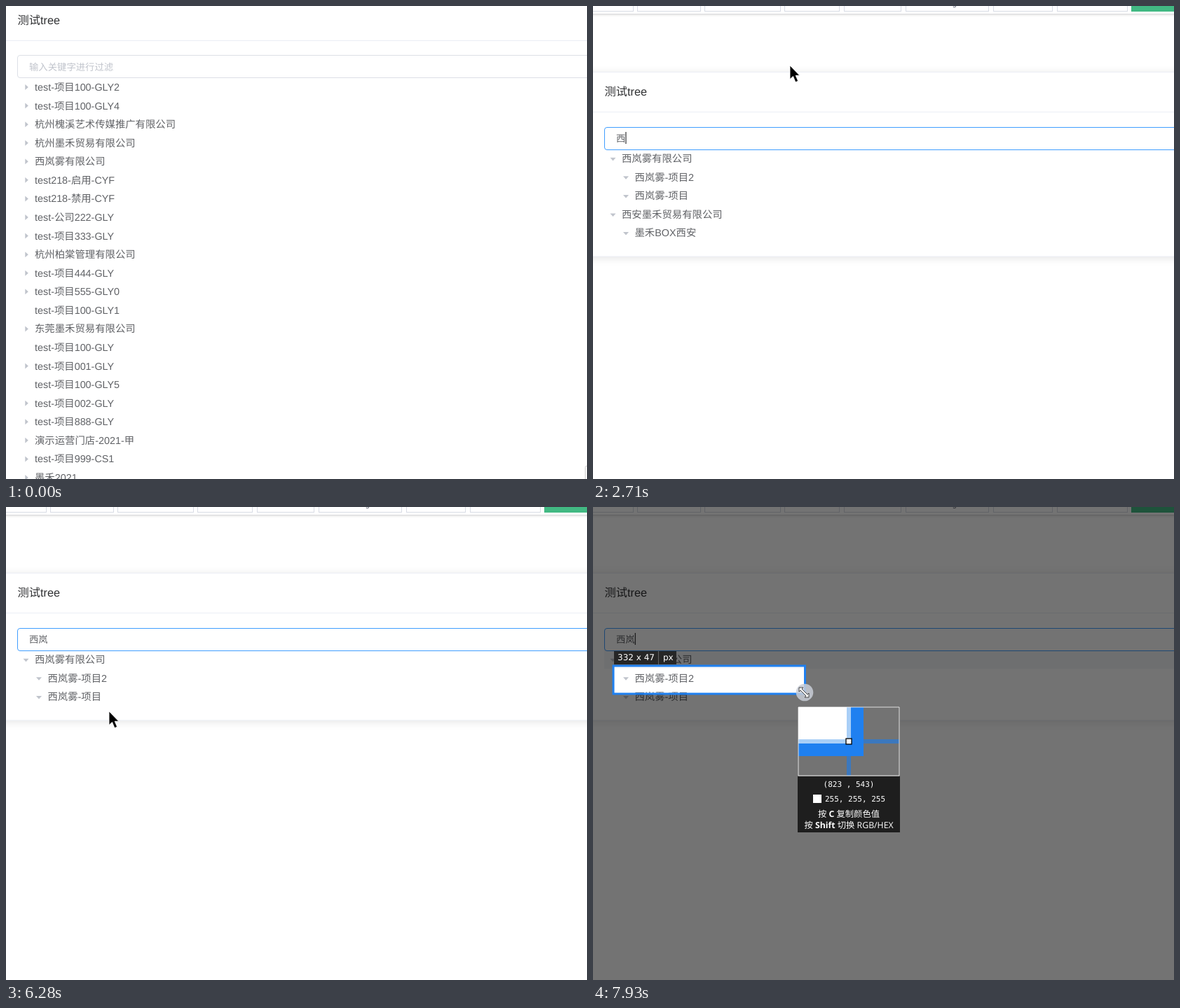
An HTML page for the animation above (8000 ms loop, 829 px wide and 676 px high).

```html
<!DOCTYPE html>
<html lang="zh-CN">
<head>
<meta charset="utf-8">
<style>
html, body { margin: 0; width: 100%; height: 100%; overflow: hidden; background: #fff; }
svg { display: block; width: 829px; height: 676px; font: 14.36px "Liberation Sans", "Noto Sans CJK SC", "Noto Sans CJK", sans-serif; }
.card { filter: drop-shadow(0 2px 6px rgba(0,0,0,.1)); }
.bar { filter: drop-shadow(0 1px 1.5px rgba(0,0,0,.12)); }
.size { font: 12px "DejaVu Sans", sans-serif; }
.mono { font: 11px "DejaVu Sans Mono", monospace; }
.tip { font: 12.3px "Open Sans", "Noto Sans CJK SC", "Noto Sans CJK", sans-serif; }
</style>
</head>
<body>
<svg id="stage" viewBox="0 0 829 676" text-rendering="geometricPrecision"></svg>
<script>
const LOOP = 8000, ROW = 26.57, TOP = 102.7;
const ENTER = 70, FILTER = 2240, REFINE = 3110, SNIP = 6800, PRESS = 7310, DRAG = 7510, PULL = 7580, END = 7930;
const BLUE = '#1f80f0';
const stage = document.getElementById('stage');

// "*" marks a leaf without an arrow
const ALL = ['test-项目100-GLY2', 'test-项目100-GLY4', '杭州槐溪艺术传媒推广有限公司', '杭州墨禾贸易有限公司',
  '西岚雾有限公司', 'test218-启用-CYF', 'test218-禁用-CYF', 'test-公司222-GLY', 'test-项目333-GLY',
  '杭州柏棠管理有限公司', 'test-项目444-GLY', 'test-项目555-GLY0', '*test-项目100-GLY1', '东莞墨禾贸易有限公司',
  '*test-项目100-GLY', 'test-项目001-GLY', '*test-项目100-GLY5', 'test-项目002-GLY', 'test-项目888-GLY',
  '演示运营门店-2021-甲', 'test-项目999-CS1', '墨禾2021'];

const PATH = [[0, 840, 656], [ENTER, 840, 656], [400, 410, 200], [690, 281, 85], [3920, 281, 85], [4250, 166, 190],
  [4690, 130, 250], [4760, 142, 262], [5130, 500, 480], [5510, 732, 639], [5580, 674, 650], [6000, 345, 395],
  [6280, 147, 292], [6430, 147, 292], [6790, 30, 227], [LOOP, 30, 227]];

const clamp = v => Math.max(0, Math.min(1, v));
const lerp = (a, b, p) => a + (b - a) * p;
const ease = p => p < .5 ? 2 * p * p : 1 - 2 * (1 - p) ** 2;
const rect = (x, y, w, h, fill, more = '') => `<rect x="${x}" y="${y}" width="${w}" height="${h}" fill="${fill}" ${more}/>`;
const text = (x, y, s, fill, more = '') => `<text x="${x}" y="${y}" fill="${fill}" ${more}>${s}</text>`;
const group = (x, y, s) => `<g transform="translate(${x} ${y})">${s}</g>`;

function pointer(t) {
  const i = PATH.findIndex(k => k[0] > t), a = PATH[i - 1], b = PATH[i];
  const p = (t - a[0]) / (b[0] - a[0]);
  return [lerp(a[1], b[1], p), lerp(a[2], b[2], p)];
}

function row(name, y, depth = 0, turn = 0) {
  const x = depth * 18.5, leaf = name[0] === '*';
  const arrow = `<path d="M-1.2-4 3.3 0-1.2 4z" fill="#c0c4cc" transform="translate(${28.5 + x} ${y}) rotate(${turn})"/>`;
  return (leaf ? '' : arrow) + text(41 + x, y + 5, leaf ? name.slice(1) : name, '#606266');
}

const opening = t => ease(clamp((t - FILTER - 20) / 300));

function tree(t) {
  if (t < FILTER) return ALL.map((s, i) => row(s, 116 + i * ROW)).join('');
  const open = opening(t), h = 2 * ROW * open;
  let s = row('西岚雾有限公司', 116, 0, 90 * open) +
    `<clipPath id="kids">${rect(0, TOP + ROW, 829, h, '#000')}</clipPath><g clip-path="url(#kids)">` +
    row('西岚雾-项目2', 116 + ROW, 1, 90) + row('西岚雾-项目', 116 + 2 * ROW, 1, 90) + '</g>';
  if (t < REFINE) s += row('西安墨禾贸易有限公司', 116 + ROW + h, 0, 90) + row('墨禾BOX西安', 116 + 2 * ROW + h, 1, 90);
  return s;
}

function tabs() {
  const edges = [[-9, 58], [63, 154], [159, 268], [273, 352], [358, 440], [446, 565], [571, 656], [662, 763]];
  return rect(-9, -20, 850, 31.5, '#fff', 'class="bar" stroke="#dcdcdf"') +
    edges.map(([a, b]) => rect(a + .5, -20, b - a - 1, 27.5, '#fff', 'stroke="#d8dce5"')).join('') +
    rect(768, -20, 70, 28, '#42b983') + text(513, 0, 'g', '#495060', 'font-size="10"');
}

function caretOn(t) {
  if (t < 890) return false;
  const from = t < FILTER ? 890 : t < REFINE ? FILTER : REFINE;
  return Math.floor((Math.min(t, SNIP) - from) / 530) % 2 === 0;
}

function page(t, [mx, my]) {
  const short = t >= FILTER, shift = short ? 102 : 0, inputTop = short ? 71.5 : 70.5;
  const count = !short ? ALL.length : t < REFINE ? 3 + 2 * opening(t) : 3;
  const bottom = TOP + count * ROW + 20.5;
  const y = my - shift, over = mx < 829 ? Math.floor((y - TOP) / ROW) : -1;
  const inInput = y > 70 && y < 103;
  const f = clamp((t - 890) / 130), base = inInput ? [192, 196, 204] : [220, 223, 230];
  const edge = [64, 158, 255].map((c, i) => Math.round(lerp(base[i], c, f)));
  const typed = !short ? '' : t < REFINE ? '西' : '西岚';
  const card = rect(-30, -7.5, 900, bottom + 7.5, '#fff', 'class="card" stroke="#ebeef5"') +
    text(16.5, 26, '测试tree', '#303133', 'font-size="16.3"') + rect(0, 49, 829, 1, '#ebeef5') +
    (over >= 0 && over < count ? rect(16, TOP + over * ROW, 820, ROW, '#f5f7fa') : '') +
    rect(16.5, inputTop, 850, 32, '#fff', `rx="3.5" stroke="rgb(${edge})"`) +
    text(33, 92, typed || '输入关键字进行过滤', typed ? '#606266' : '#c0c4cc', 'font-size="13.35"') +
    (caretOn(t) ? rect(33 + typed.length * 13.35, 78, 1.2, 17, '#303133') : '') + tree(t);
  const corner = t < ENTER ? rect(826.5, 657.5, 20, 30, '#fff', 'rx="2" stroke="#ccc"') : '';
  return (short ? tabs() : '') + group(0, shift, card) + corner + (t < SNIP ? cursor(mx, my, inInput) : '');
}

function cursor(x, y, beam) {
  return group(x, y, beam
    ? '<path d="M-3.5-9.5h2.5l1 1 1-1h2.5M-3.5 10h2.5l1-1 1 1h2.5M0-8.5V9" fill="none" stroke="#000" stroke-width="1.5"/>'
    : '<path d="M0 0V19.5L4.5 15.5 8 23.8 11.6 22.2 8.2 14.3H13.8z" stroke="#fff" stroke-width=".8"/>');
}

function zoom(p) {
  if (!p) return rect(1, 1, 144, 98, '#f5f7fa') + rect(1, 75, 144, 24, '#fff') + rect(59, 2, 5, 5, '#ddd') +
    rect(1, 47, 144, 6, '#a9cff7') + rect(70, 1, 6, 98, '#a9cff7');
  return rect(1, 1, 144, 98, '#737373') + rect(1, 1, 93, 70, BLUE) + rect(1, 1, 75, 52, '#a9cff7') +
    rect(1, 1, 69, 46, '#fff') + rect(94, 47, 51, 6, '#3c78bd') + rect(70, 71, 6, 28, '#3c78bd');
}

function loupe(p) {
  const mid = 'text-anchor="middle" class=';
  const rgb = p ? [255, 255, 255] : [245, 247, 250];
  return group(lerp(40, 292, p), lerp(250, 285, p), rect(0, 0, 146, 180, '#1e1e1e') + zoom(p) +
    rect(.9, .9, 144.2, 98.2, 'none', 'stroke="#fff"') +
    rect(69, 46, 8, 8, '#fff', 'stroke="#000" stroke-width="1.3"') +
    text(73, 115, `(${Math.round(lerp(492, 823, p))} , ${Math.round(lerp(497, 543, p))})`, '#fff', mid + '"mono"') +
    rect(22, 126, 12, 12, `rgb(${rgb})`) + text(39, 136, rgb.join(', '), '#fff', 'class="mono"') +
    text(73, 157.5, '按 <tspan font-weight="700">C</tspan> 复制颜色值', '#fff', mid + '"tip"') +
    text(73, 174, '按 <tspan font-weight="700">Shift</tspan> 切换 RGB/HEX', '#fff', mid + '"tip"'));
}

function sizeLabel(p) {
  const s = `${Math.round(lerp(4, 332, p))} x ${Math.round(lerp(3, 47, p))}`;
  const w = 15.3 + (s.length - 4) * 7.63 + 7.1;
  return rect(30, 206, w + 36, 19, '#262626') + text(35, 219, s, '#fff', 'class="size"') +
    rect(35 + w + 5, 206, 1, 19, '#666') + text(35 + w + 12, 219, 'px', '#fff', 'class="size"');
}

function snip(t) {
  const p = clamp((t - PULL) / (END - PULL)), drag = t >= DRAG;
  const w = lerp(3, 273.5, p), h = lerp(2.5, 40, p);
  const x = drag ? lerp(41, 302, p) : 29.5, y = drag ? lerp(233, 265, p) : 227.5;
  let s = '';
  if (drag) s += `<path d="M0 0H829V676H0zM29 227v${h}h${w}v${-h}z" fill="rgba(0,0,0,.55)" fill-rule="evenodd"/>` +
    rect(29, 227, w, h, 'none', `stroke="${BLUE}" stroke-width="${lerp(1.5, 3, p)}"`) + sizeLabel(p);
  s += loupe(p);
  if (t >= PRESS) s += `<circle cx="${x}" cy="${y}" r="12.3" fill="${t < 7900 ? 'rgba(214,208,40,.8)' : 'rgba(200,205,214,.85)'}"/>`;
  return s + group(x, y, drag
    ? '<path d="M-8-8h6l-2 2 8 8 2-2v6h-6l2-2-8-8-2 2z" transform="translate(0 1)" fill="#fff" stroke="#333" stroke-width=".9"/>'
    : '<path d="M-9 0H9M0-9V9" stroke="#fff" stroke-width="3"/><path d="M-9 0H9M0-9V9" stroke="#333"/>');
}

function draw() {
  const t = performance.now() % LOOP;
  stage.innerHTML = page(t, pointer(t)) + (t >= SNIP ? snip(t) : '');
  requestAnimationFrame(draw);
}
draw();
</script>
</body>
</html>
```
